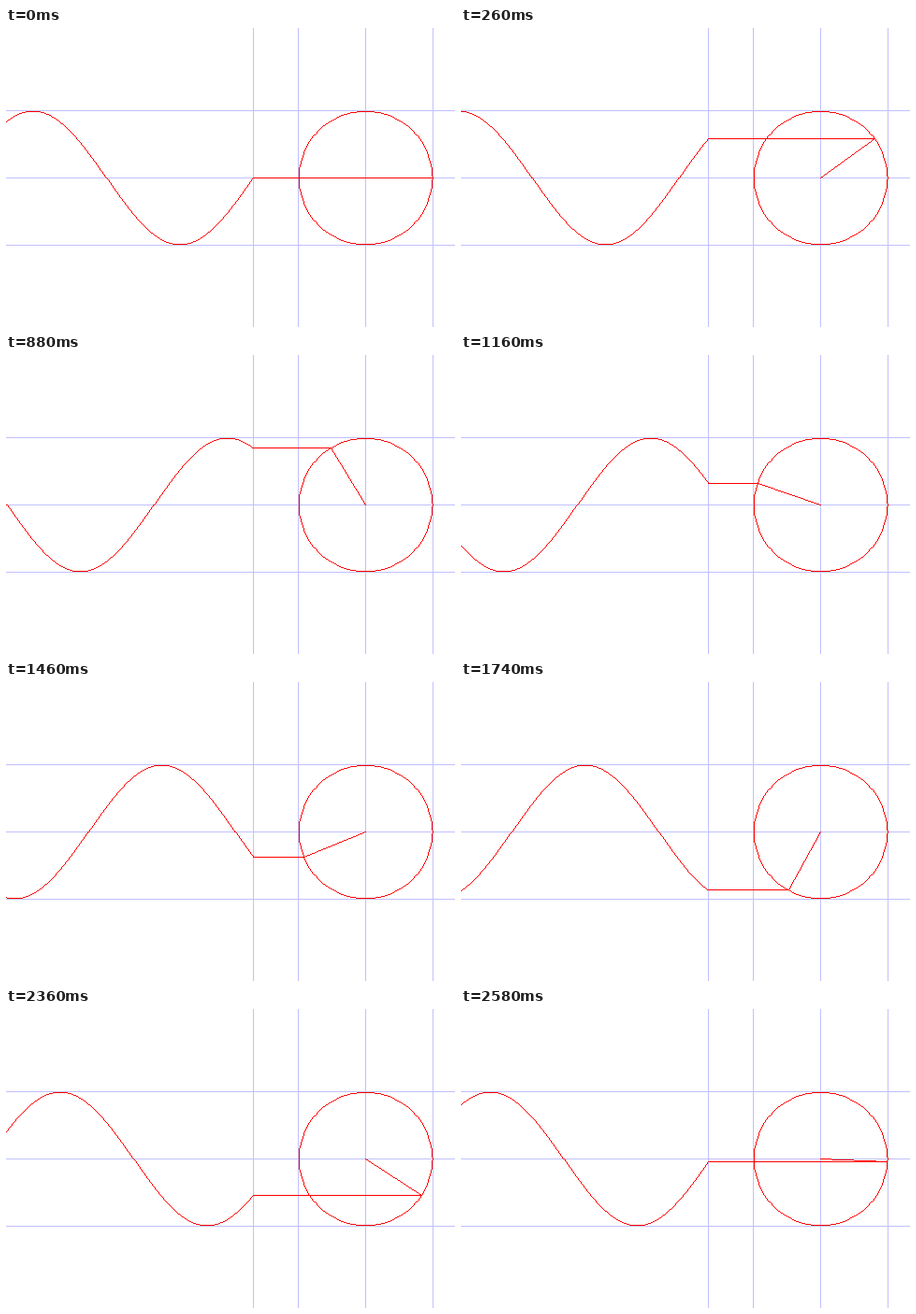
Animation, 480 px wide and 320 px high, one loop 2620 ms. Source, as a matplotlib script:

```python
import numpy as np
import matplotlib.pyplot as plt
from matplotlib.animation import FuncAnimation

W, H, DPI = 480, 320, 100
STEPS = 130            # positions in one turn
FRAMES = STEPS + 1     # the last position is held for one extra tick
CX, CY, R = 384, 160, 72
WAVE_X = 264           # where the wave is born
WAVE_SCALE = 50        # pixels per radian

RED = (255, 0, 0)
GRID = (192, 192, 255)


def draw_line(img, x0, y0, x1, y1):
    """One-pixel hard-edged line."""
    n = max(abs(x1 - x0), abs(y1 - y0), 1)
    t = np.arange(n + 1) / n
    xs = np.floor(x0 + (x1 - x0) * t + 0.5).astype(int)
    ys = np.floor(y0 + (y1 - y0) * t + 0.5).astype(int)
    img[ys, xs] = RED


def draw_path(img, xs, ys):
    for x0, y0, x1, y1 in zip(xs[:-1], ys[:-1], xs[1:], ys[1:]):
        draw_line(img, x0, y0, x1, y1)


def circle_x(angle):
    return CX + np.trunc(R * np.cos(angle) + 1e-9).astype(int)


def circle_y(angle):
    return CY - np.trunc(R * np.sin(angle) + 1e-9).astype(int)


def make_backdrop():
    img = np.full((H, W, 3), 255, np.uint8)
    img[:, [WAVE_X, CX - R, CX, CX + R]] = GRID
    img[[CY - R, CY, CY + R], :] = GRID
    turn = np.linspace(0, 2 * np.pi, STEPS + 1)
    draw_path(img, circle_x(turn), circle_y(turn))
    return img


backdrop = make_backdrop()
wave_xs = np.arange(WAVE_X + 1)
wave_lag = (WAVE_X - wave_xs) / WAVE_SCALE


def render(step):
    img = backdrop.copy()
    angle = 2 * np.pi * step / STEPS
    px, py = int(circle_x(angle)), int(circle_y(angle))
    draw_path(img, wave_xs, circle_y(angle - wave_lag))
    draw_line(img, WAVE_X, py, px, py)
    draw_line(img, CX, CY, px, py)
    return img


fig = plt.figure(figsize=(W / DPI, H / DPI), dpi=DPI, facecolor="white")
ax = fig.add_axes([0, 0, 1, 1])
ax.axis("off")
picture = ax.imshow(render(0), interpolation="nearest", aspect="auto")


def update(i):
    picture.set_data(render(min(i, STEPS - 1)))
    return [picture]


anim = FuncAnimation(fig, update, frames=FRAMES, interval=20,
                     repeat=True, repeat_delay=0, blit=False)
plt.show()
```
